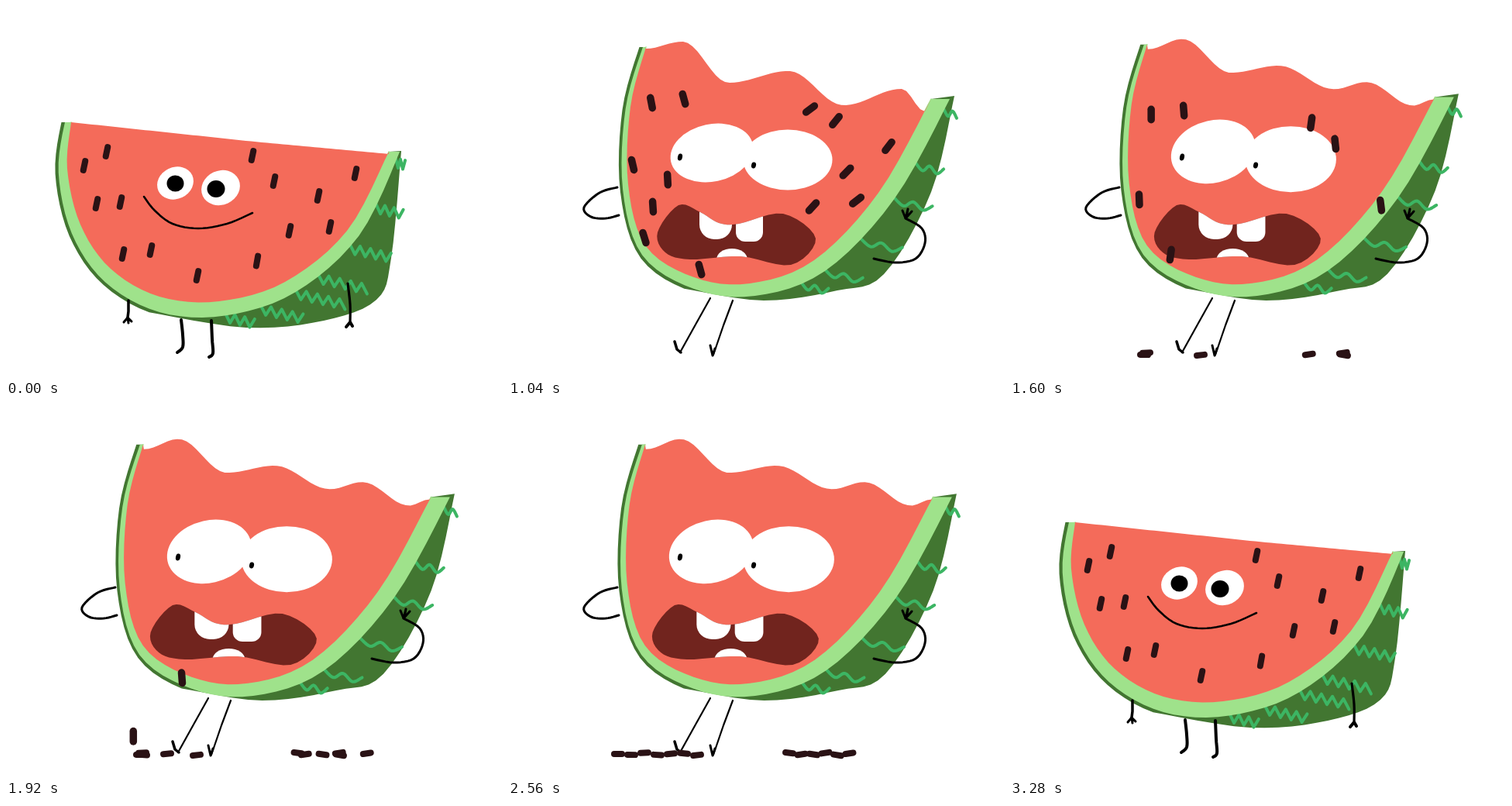
These frames come from a looping animation (640x480 px, 3360 ms). An HTML page with a canvas:

```html
<!DOCTYPE html>
<html lang="en">
<head>
<meta charset="utf-8">
<title>Watermelon</title>
<style>
html, body { margin: 0; width: 100%; height: 100%; overflow: hidden; background: #fff; }
canvas { display: block; }
</style>
</head>
<body>
<canvas id="stage" width="640" height="480"></canvas>
<script>
const ctx = document.getElementById('stage').getContext('2d');
const STEP = 80, COUNT = 42;
const SHAKE = 13, CALM_DOWN = 37, FALL = 4;
const FLESH = '#f46b5a', LIGHT = '#9fe28b', DARK = '#427631', STRIPE = '#3cb563',
  SEED = '#2a1215', MOUTH = '#71241e', INK = '#000', WHITE = '#fff';
const { PI, sin, cos } = Math;

const lerp = (a, b, k) => a + (b - a) * k;
const clamp = v => Math.max(0, Math.min(1, v));
const mix = (p, q, k) => p.map((v, i) => Array.isArray(v) ? mix(v, q[i], k) : lerp(v, q[i], k));
const pairs = s => s.split(' ').map(p => p.split(',').map(Number));

// Dense points of a Catmull-Rom curve.
function smooth(p, closed = false, per = 6) {
  const n = p.length, out = [];
  const at = i => closed ? p[(i + n) % n] : p[Math.max(0, Math.min(n - 1, i))];
  for (let i = 0; i < (closed ? n : n - 1); i++) {
    const [a, b, c, d] = [at(i - 1), at(i), at(i + 1), at(i + 2)];
    for (let j = 0; j < per; j++) {
      const t = j / per;
      out.push([0, 1].map(m => b[m] + t / 2 * (c[m] - a[m]
        + t * (2 * a[m] - 5 * b[m] + 4 * c[m] - d[m])
        + t * t * (3 * b[m] - a[m] - 3 * c[m] + d[m]))));
    }
  }
  if (!closed) out.push(p[n - 1]);
  return out;
}

// Top edge through crests and valleys, eased between them.
function wave(knots, ease = u => (1 - cos(PI * u)) / 2) {
  const x0 = knots[0][0], x1 = knots[knots.length - 1][0], out = [];
  for (let i = 0; i <= 60; i++) {
    const x = lerp(x0, x1, i / 60);
    let j = 1;
    while (j < knots.length - 1 && knots[j][0] < x) j++;
    const [a, b] = [knots[j - 1], knots[j]];
    out.push([x, lerp(a[1], b[1], ease(clamp((x - a[0]) / (b[0] - a[0]))))]);
  }
  return out;
}

// rim: edge of the flesh; flank: far side of the rind;
// rind: thickness at left, at right, extra at the bottom.
const calm = {
  rim: pairs('84,150 79,210 96,282 135,339 198,375 275,381 360,356 440,290 494,188'),
  flank: pairs('310,415 410,406 478,379 497,325 510,187'),
  top: wave(pairs('84,150 320,175 494,191'), u => u),
  rind: [8, 14, 9]
};
const angry = {
  rim: pairs('178,53 158,130 155,230 178,310 240,350 312,358 395,328 478,241 546,120'),
  flank: pairs('330,380 425,367 485,346 546,240 576,116'),
  top: wave(pairs('178,55 225,46 285,99 362,84 433,128 508,107 538,136')),
  rind: [4, 24, 1]
};
const shout = {
  ...angry,
  top: wave(pairs('179,59 223,46 285,89 346,80 417,110 458,101 518,131 544,123'))
};

const lips = smooth(pairs('193,292 220,257 248,266 272,280 298,281 355,268 397,300 365,334 300,323 235,327 203,318'), true);

// Calm place and angry place, ordered by where they land.
const seeds = pairs('101,206,185,125 187,315,187,259 151,320,176,299 117,255,161,205 '
  + '148,253,206,224 130,188,227,120 247,348,248,340 318,193,390,133 366,290,393,259 '
  + '346,226,423,148 418,285,450,251 403,245,437,214 451,216,491,181')
  .map(([x, y, ax, ay], i) => ({
    x, y, ax, ay,
    tilt: i < 7 ? -11 : 45,
    gx: i < 7 ? 142 + 17 * i : 363 + 15.5 * (i - 7),
    gy: 449 + 1.5 * sin(i * 2.4)
  }));
// Low seeds drop first, in two bursts.
[...seeds].sort((a, b) => b.ay - a.ay + 0.08 * (b.ax - a.ax)).forEach((s, i) => {
  s.start = i < 6 ? SHAKE + 0.07 * i * i : 17.5 + 0.53 * (i - 6);
});

function trace(p) {
  ctx.beginPath();
  p.forEach(q => ctx.lineTo(q[0], q[1]));
}
function fill(color, p) {
  trace(p);
  ctx.closePath();
  ctx.fillStyle = color;
  ctx.fill();
}
function line(p, width, color = INK) {
  trace(p);
  ctx.lineWidth = width;
  ctx.strokeStyle = color;
  ctx.stroke();
}
const straight = (s, width) => line(pairs(s), width);
const curve = (s, width) => line(smooth(pairs(s)), width);
function oval(color, x, y, rx, ry, deg = 0) {
  ctx.beginPath();
  ctx.ellipse(x, y, rx, ry, deg * PI / 180, 0, 2 * PI);
  ctx.fillStyle = color;
  ctx.fill();
}
function drawSeed(x, y, deg, w = 9.5, len = 23) {
  const a = deg * PI / 180, h = (len - w) / 2;
  const dx = sin(a) * h, dy = -cos(a) * h;
  line([[x - dx, y - dy], [x + dx, y + dy]], w, SEED);
}
function scaled(cx, cy, sx, sy, paint) {
  ctx.save();
  ctx.translate(cx, cy);
  ctx.scale(sx, sy);
  ctx.translate(-cx, -cy);
  paint();
  ctx.restore();
}

function drawStripes(edge, mad) {
  const n = mad ? 6 : 7;
  for (let i = 0; i < n; i++) {
    const s = i / (n - 1);
    const t = mad ? 0.7 + 0.275 * s : 0.62 + 0.36 * s;
    const len = (mad ? 46 : 65) * sin(PI * (0.2 + 0.74 * s)) + (mad ? 8 : 0);
    const [x, y] = edge[Math.round(t * (edge.length - 1))];
    const corners = mad ? 3 + (len > 25) : 3 + Math.round(len / 11), p = [];
    for (let j = 0; j <= corners; j++) {
      const u = j / corners;
      p.push([x + len * u, y + 2 + 0.22 * len * u + (j % 2 ? 1 : -1) * (mad ? 4 : 6)]);
    }
    line(mad ? smooth(p) : p, 4, STRIPE);
  }
}

function drawBody(pose, mad) {
  const rim = smooth(pose.rim), last = rim.length - 1, [left, right, low] = pose.rind;
  // Offset direction turns from left through down to right.
  const offset = extra => rim.map(([x, y], i) => {
    const t = i / last, d = lerp(left, right, t) + low * sin(PI * t) + extra;
    return [x - d * cos(PI * t), y + d * sin(PI * t)];
  });
  const light = offset(0), dark = offset(4.5).slice(0, last / 2);
  const back = [...rim].reverse();
  fill(DARK, [...dark, ...smooth([dark[dark.length - 1], ...pose.flank]), ...back]);
  drawStripes(light, mad);
  fill(LIGHT, [...light, ...back]);
  line(rim, 1.5, LIGHT);
  fill(FLESH, [...rim, ...[...pose.top].reverse()]);
}

function drawCalmFace() {
  oval(WHITE, 218.5, 228.5, 24, 20.5, -25);
  oval(WHITE, 277, 234.5, 25.5, 22, -25);
  oval(INK, 218.5, 229, 11, 10.5);
  oval(INK, 271, 236, 11.5, 11);
  curve('178,246 192,264 215,281 248,287 285,281 318,267', 2.6);
}
function drawMouth() {
  fill(MOUTH, lips);
  ctx.save();
  trace(lips);
  ctx.clip();
  ctx.fillStyle = WHITE;
  ctx.beginPath();
  ctx.roundRect(247, 240, 42, 61, 19);
  ctx.roundRect(294, 240, 35, 64, 12);
  ctx.fill();
  oval(WHITE, 289, 327, 20, 14);
  ctx.restore();
}
function drawAngryFace(loud) {
  const wide = loud ? 1.02 : 1, tall = loud ? 1.09 : 1;
  scaled(300, 208, wide, tall, () => {
    oval(WHITE, 263, 189.5, 54, 37, -12);
    oval(WHITE, 361, 198.5, 57.5, 39);
  });
  oval(INK, 222, 195, 3, 4.5, 12);
  oval(INK, 317, 205.5, 3, 4, 12);
  scaled(320, 310, loud ? 1.05 : 1, 1, drawMouth);
}

function drawCalmLimbs() {
  straight('158,380 158,394 157,402', 3.5);
  straight('152,408 157,402 158,409 157,402 162,407', 3);
  curve('226,405 228,424 228,440 221,447', 4);
  curve('265,406 266,430 267,448 262,453', 4);
  curve('441,358 444,385 444,408', 3.2);
  straight('439,414 444,408 447,413', 4);
}
function drawAngryLimbs() {
  curve('141,234 118,241 98,260 107,272 126,274 143,270', 3);
  curve('472,326 500,331 526,326 538,306 534,287 513,274', 3);
  straight('509,264 513,274 516,262 514,273 521,265', 3);
  straight('261,377 242,411 222,447', 2.2);
  straight('215,433 218,443 223,447', 3.5);
  straight('290,380 278,412 265,450', 2.2);
  straight('261,438 264,451 267,442', 3);
}

function drawLooseSeed(s, i, f) {
  const k = clamp((f - SHAKE) / 4), u = clamp((f - s.start) / FALL);
  const shake = u > 0 ? 0 : 4 * sin((f - SHAKE) * PI / 4);
  const rest = s.gx + 0.5 * (s.ax - s.gx) * (1 - clamp((f - 24) / 4));
  if (u < 1) {
    const x = lerp(s.ax + shake, rest, u), y = lerp(s.ay + 15 * k, s.gy, u * u);
    drawSeed(x, y, s.tilt * (1 - k) + 8 * sin(i * 2));
  } else drawSeed(rest, s.gy, 90 + 9 * sin(i * 3), 8, 18);
}

// 0 is calm, 1 is angry; swings a little past calm on the way back.
function mood(f) {
  if (f < CALM_DOWN) {
    const u = clamp((f - 7.3) / 5);
    return u * u * (3 - 2 * u);
  }
  const u = f - CALM_DOWN;
  return u > 3 ? 0 : cos(u * 0.85) * Math.exp(-0.4 * u);
}

function draw(f) {
  const k = mood(f), mad = k > 0.4;
  const loud = f >= SHAKE && f < CALM_DOWN && (f - SHAKE) % 4 >= 2;
  const goal = loud ? shout : angry, pose = {};
  for (const key in calm) pose[key] = mix(calm[key], goal[key], k);
  const squash = f > CALM_DOWN ? Math.max(0, -k) * 0.5 : 0;
  const boil = f < 8 && f % 4 >= 2 ? 0.005 : 0;

  ctx.fillStyle = WHITE;
  ctx.fillRect(0, 0, 640, 480);
  ctx.lineCap = ctx.lineJoin = 'round';
  scaled(290, 455, 1 + squash, 1 - squash + boil, () => {
    const grow = loud ? 1.01 : 1;
    scaled(290, 379, grow, grow, () => drawBody(pose, mad));
    if (f < SHAKE || !mad) {
      for (const s of seeds) {
        drawSeed(lerp(s.x, s.ax, k), lerp(s.y, s.ay, k), lerp(12, s.tilt, k), lerp(8, 9.5, k), lerp(20, 24, k));
      }
      if (!mad) drawSeed(324, 329, 10, 8, 21);
    }
    if (mad) { drawAngryFace(loud); drawAngryLimbs(); }
    else { drawCalmFace(); drawCalmLimbs(); }
  });
  if (f >= SHAKE && mad) seeds.forEach((s, i) => drawLooseSeed(s, i, f));
}

const begin = performance.now();
function tick() {
  draw(Math.floor((performance.now() - begin) / STEP) % COUNT);
  requestAnimationFrame(tick);
}
tick();
</script>
</body>
</html>
```
